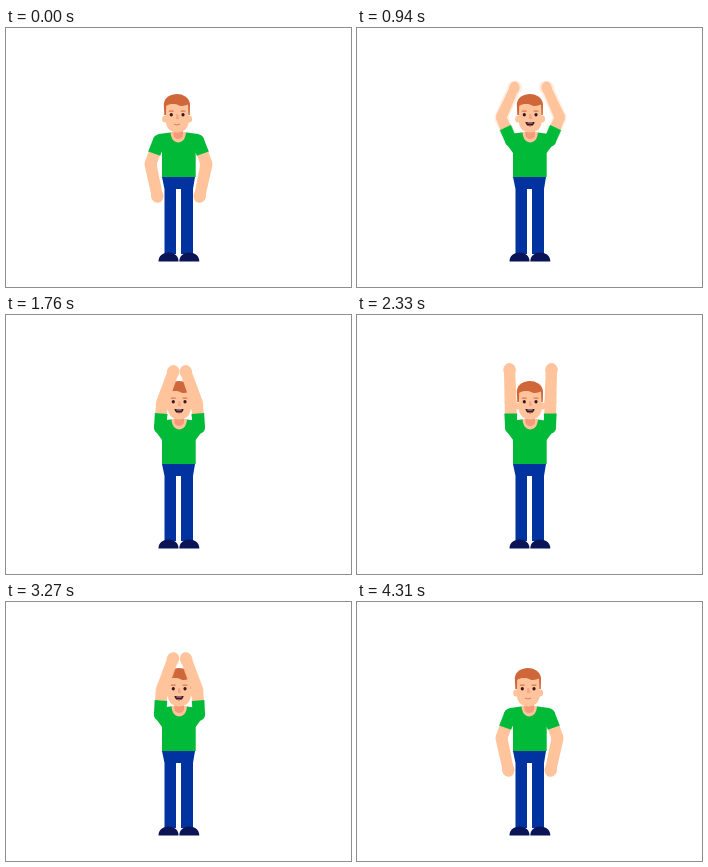
Animation of 345x259 px, one loop 4.4 s. Source, as an HTML page with a canvas:

```html
<!DOCTYPE html>
<html lang="en">
<head>
<meta charset="utf-8">
<title>Clapping man</title>
<style>
  html, body { margin: 0; width: 100%; height: 100%; overflow: hidden; background: #fff; }
  canvas { display: block; width: 345px; height: 259px; }
</style>
</head>
<body>
<canvas id="stage"></canvas>
<script>
const W = 345, H = 259, LOOP = 4400;
const START = 350, END = 3930;      // arms are moving between these times
const RISE = 660, CLAPS = 6;
const SHUTTER = 12, GHOST = 0.3;    // half the gap between blended poses, their opacity
const UPPER = 25, FORE = 32.5, SHOULDER = [153, 112.5];
const CLOSED = [185, 200], OPEN = [179, 178];
const SKIN = '#ffc49c', SHIRT = '#00ba38', PANTS = '#0033a0', SHOE = '#0b1457',
      HAIR = '#d0673a', SHADE = '#f79a7a', DARK = '#3a1622';

// time since the start of the rise, upper arm angle, forearm angle (0 = down, 90 = outward)
const RISE_KEYS = [
  [0, 20, -12], [130, 26, -8], [280, 50, 8], [380, 82, 41], [440, 102, 85],
  [500, 125, 130], [530, 138, 165], [570, 153, 200], [600, 158, 205], [RISE, ...CLOSED]
];

const scale = Math.max(1, window.devicePixelRatio || 1);

function layer(canvas) {
  canvas.width = Math.round(W * scale);
  canvas.height = Math.round(H * scale);
  const ctx = canvas.getContext('2d');
  ctx.scale(scale, scale);
  return ctx;
}

const main = layer(document.getElementById('stage'));
const poseA = layer(document.createElement('canvas'));
const poseB = layer(document.createElement('canvas'));

const clamp = (v, lo, hi) => Math.min(hi, Math.max(lo, v));
const ramp = (v, a, b) => {
  const u = clamp((v - a) / (b - a), 0, 1);
  return u * u * (3 - 2 * u);
};

// Pictures change in bursts of six, the last one held longer.
function stepTime(t) {
  if (t < START || t >= END) return t;
  const d = t - START;
  return START + Math.floor(d / 220) * 220 + Math.min(5, Math.floor(d % 220 / 30)) * 30;
}

// Smooth curve through the rows of the table.
function curve(keys, t, col) {
  const last = keys.length - 1;
  if (t <= keys[0][0]) return keys[0][col];
  if (t >= keys[last][0]) return keys[last][col];
  const i = keys.findIndex(k => k[0] > t) - 1;
  const slope = n => n === 0 || n === last ? 0 :
    (keys[n + 1][col] - keys[n - 1][col]) / (keys[n + 1][0] - keys[n - 1][0]);
  const [a, b] = [keys[i], keys[i + 1]];
  const h = b[0] - a[0], u = (t - a[0]) / h, v = 1 - u;
  return (1 + 2 * u) * v * v * a[col] + u * v * v * h * slope(i) +
         u * u * (3 - 2 * u) * b[col] - u * u * v * h * slope(i + 1);
}

// The fall is the rise played backwards.
const riseTime = t => Math.min(t - START, END - t);

// 0 = calm at rest, 1 = smiling and leaning slightly to the right
const joyAt = t => ramp(riseTime(t), 50, 210);

function armAngles(t) {
  const s = riseTime(t);
  if (s < RISE) return [curve(RISE_KEYS, s, 1), curve(RISE_KEYS, s, 2)];
  const phase = (t - START - RISE) / (END - START - 2 * RISE) * CLAPS;
  const open = (1 - Math.cos(phase * 2 * Math.PI)) / 2;
  return CLOSED.map((c, i) => c + (OPEN[i] - c) * open);
}

function fill(ctx, color, build) {
  ctx.fillStyle = color;
  ctx.beginPath();
  build(ctx);
  ctx.fill();
}

function poly(ctx, color, points) {
  fill(ctx, color, c => {
    points.forEach(([x, y]) => c.lineTo(x, y));
    c.closePath();
  });
}

function oval(ctx, color, x, y, rx, ry = rx) {
  fill(ctx, color, c => c.ellipse(x, y, rx, ry, 0, 0, 2 * Math.PI));
}

const radians = a => a * Math.PI / 180;

function arm(ctx, [up, fore]) {
  ctx.save();
  ctx.translate(...SHOULDER);
  ctx.rotate(radians(up));

  ctx.save();
  ctx.translate(0, UPPER);
  ctx.rotate(radians(fore - up));
  poly(ctx, SKIN, [[-6, 0], [6, 0], [5.6, FORE], [-5.6, FORE]]);
  oval(ctx, SKIN, 0, FORE, 6.3, 7);
  ctx.restore();

  poly(ctx, SKIN, [[-5.9, 8], [5.9, 8], [6, UPPER], [-6, UPPER]]);
  oval(ctx, SKIN, 0, UPPER, 6);
  poly(ctx, SHIRT, [[-6, 0], [6, 0], [6.4, 14], [-6.4, 14]]);
  oval(ctx, SHIRT, 0, 0, 6.2);
  ctx.restore();
}

function arms(ctx, t) {
  const angles = armAngles(t);
  ctx.save();
  ctx.translate(joyAt(t), 0);
  arm(ctx, angles);
  ctx.translate(W, 0);
  ctx.scale(-1, 1);
  arm(ctx, angles);
  ctx.restore();
}

const paste = ctx => main.drawImage(ctx.canvas, 0, 0, W, H);

// Two neighbouring poses, faint where they differ and solid where they meet.
function blurredArms(t) {
  main.globalAlpha = GHOST;
  [poseA, poseB].forEach((ctx, i) => {
    ctx.clearRect(0, 0, W, H);
    arms(ctx, t + (i ? SHUTTER : -SHUTTER));
    paste(ctx);
  });
  main.globalAlpha = 1;
  poseA.globalCompositeOperation = 'destination-in';
  poseA.drawImage(poseB.canvas, 0, 0, W, H);
  poseA.globalCompositeOperation = 'source-over';
  paste(poseA);
}

function shoe(x) {
  fill(main, SHOE, c => {
    c.moveTo(x, 233.6);
    c.bezierCurveTo(x, 228, x + 4, 224.5, x + 10, 224.5);
    c.bezierCurveTo(x + 16, 224.5, x + 20, 228, x + 20, 233.6);
  });
}

function body() {
  poly(main, PANTS, [[156, 149], [189, 149], [187, 161], [187, 226], [175, 226],
    [175, 161], [170, 161], [170, 226], [158.5, 226], [158.5, 161]]);
  shoe(152.5);
  shoe(173.3);
  poly(main, SHIRT, [[153, 106], [164, 104.5], [181, 104.5], [192, 106], [197, 115],
    [189.7, 125], [189.7, 149], [156, 149], [156, 125], [148.8, 115]]);
}

function neck(joy) {
  main.save();
  main.translate(joy, 0);
  fill(main, SKIN, c => {
    c.moveTo(164.5, 104);
    c.bezierCurveTo(165, 118, 179.5, 118, 180, 104);
  });
  fill(main, SHADE, c => {
    c.rect(167.5, 99, 9.5, 8);
    c.ellipse(172.2, 107, 4.8, 4, 0, 0, Math.PI);
  });
  main.restore();
}

function mouth(open) {
  if (open < 0.5) {
    main.strokeStyle = '#e07c62';
    main.lineWidth = 1;
    main.beginPath();
    main.moveTo(168, 96);
    main.quadraticCurveTo(171, 98, 174, 96);
    main.stroke();
    return;
  }
  main.save();
  main.translate(171, 94);
  main.scale(1, open);
  main.beginPath();
  main.moveTo(-4.6, 0);
  main.lineTo(4.6, 0);
  main.bezierCurveTo(4, 5.6, -4, 5.6, -4.6, 0);
  main.clip();
  main.fillStyle = DARK;
  main.fillRect(-5, 0, 10, 6);
  main.fillStyle = '#fff';
  main.fillRect(-2.6, 0.6, 5.2, 0.7);
  oval(main, '#e2554f', 0, 4.2, 2.4, 1.2);
  main.restore();
}

function head(joy) {
  main.save();
  main.translate(2 * joy, 0);
  oval(main, SKIN, 159, 91, 2.8, 3.6);
  oval(main, SKIN, 183.3, 91, 2.8, 3.6);
  fill(main, HAIR, c => {
    c.moveTo(158.3, 87);
    c.lineTo(157.8, 76);
    c.bezierCurveTo(159, 63, 182, 62.5, 184, 76);
    c.lineTo(183.8, 87);
  });
  fill(main, SKIN, c => {
    c.moveTo(160.2, 78);
    c.bezierCurveTo(164, 75.5, 169, 75.5, 173, 77.5);
    c.bezierCurveTo(176, 78.5, 179, 78, 182, 76.5);
    c.lineTo(182.8, 94);
    c.bezierCurveTo(182, 101, 177, 104.5, 171.2, 104.5);
    c.bezierCurveTo(165.5, 104.5, 160.5, 101, 159.8, 94);
  });
  for (const x of [165.3, 177]) {
    main.fillStyle = HAIR;
    main.fillRect(x - 2.4, 82.6, 4.8, 1);
    oval(main, DARK, x, 86.8, 1.6, 1.8);
  }
  poly(main, '#f7a587', [[170.4, 86], [172, 86], [173.2, 91], [169.8, 91]]);
  mouth(joy);
  main.restore();
}

function draw(now) {
  const t = stepTime(now % LOOP);
  const joy = joyAt(t);
  main.fillStyle = '#fff';
  main.fillRect(0, 0, W, H);
  body();
  neck(joy);
  head(joy);
  if (t > START && t < END) blurredArms(t);
  else arms(main, t);
}

const begin = performance.now();
function tick() {
  draw(performance.now() - begin);
  requestAnimationFrame(tick);
}
tick();
</script>
</body>
</html>
```
